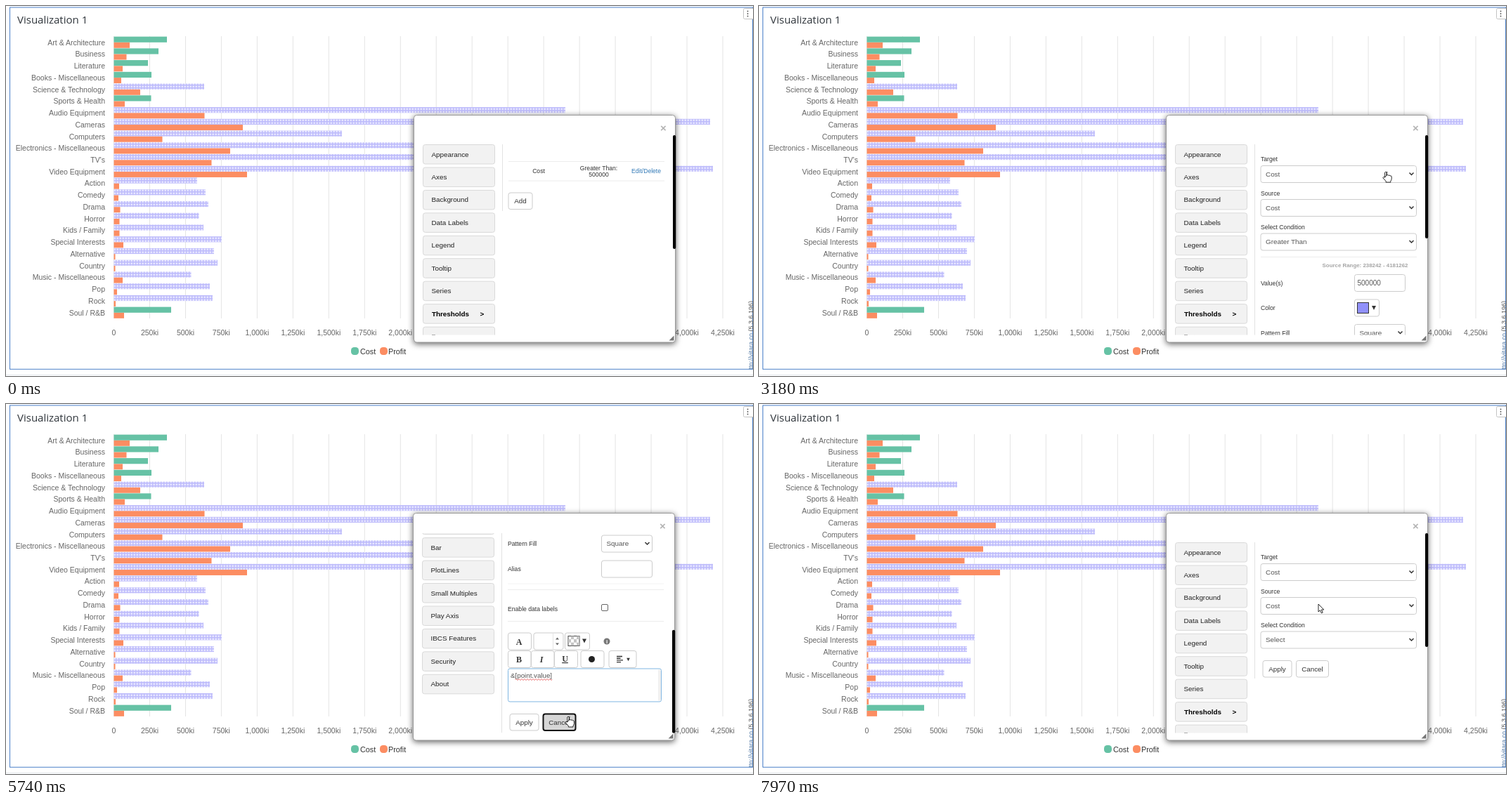
Animation of 1063x527 px, one loop 8000 ms. Source, as an HTML page:

```html
<!DOCTYPE html>
<html lang="en">
<head>
<meta charset="utf-8">
<title>Chart thresholds</title>
<style>
html, body { margin: 0; width: 100%; height: 100%; overflow: hidden; background: #fff; }
svg { display: block; font-family: "Liberation Sans", Arial, sans-serif; }
#panel { filter: drop-shadow(0 2.5px 4px rgba(0,0,0,.62)); }
</style>
</head>
<body>
<svg id="stage" width="1063" height="527" viewBox="0 0 1063 527"></svg>
<script>
const DURATION = 8000;

// Drawing helpers
const rect = (x, y, w, h, fill, extra = '') =>
  `<rect x="${x}" y="${y}" width="${w}" height="${h}" fill="${fill}" ${extra}/>`;
const path = (d, stroke, extra = '') => `<path d="${d}" fill="none" stroke="${stroke}" ${extra}/>`;
const solid = (d, fill) => `<path d="${d}" fill="${fill}"/>`;
const text = (x, y, size, str, fill = '#333', extra = '') =>
  `<text x="${x}" y="${y}" font-size="${size}" fill="${fill}" ${extra}>${str.replace(/&/g, '&amp;').replace(/>/g, '&gt;')}</text>`;
const group = (id, body, extra = '') => `<g id="${id}" ${extra}>${body}</g>`;
const rule = (y, color = '#ececec') => path(`M714 ${y}H936`, color);
const END = 'text-anchor="end"', MID = 'text-anchor="middle"', BOLD = 'font-weight="bold"';

// Chart: label, right edge of cost bar, right edge of profit bar
const rows = [
  ['Art & Architecture', 229, 176], ['Business', 217, 171.5], ['Literature', 202, 166],
  ['Books - Miscellaneous', 207, 164], ['Science & Technology', 282, 191], ['Sports & Health', 206.5, 169],
  ['Audio Equipment', 796, 282.5], ['Cameras', 1002, 337], ['Computers', 478, 222.5],
  ['Electronics - Miscellaneous', 800, 319], ["TV's", 700, 292.5], ['Video Equipment', 1006, 343],
  ['Action', 272, 161], ['Comedy', 284, 160], ['Drama', 288, 162.5], ['Horror', 274.5, 161.5],
  ['Kids / Family', 281, 161.5], ['Special Interests', 307, 167], ['Alternative', 296, 155.5],
  ['Country', 301, 155.5], ['Music - Miscellaneous', 263.5, 166], ['Pop', 290, 158],
  ['Rock', 294, 156], ['Soul / R&B', 235, 168]
];
const X0 = 153.5, TICK = 50.97, ROW = 16.74, TOP = 43.6;
const GREEN = '#66c2a5', ORANGE = '#fc8d62';

function chart() {
  let out = rect(5.5, 2, 1057, 515.3, '#fff', 'stroke="#4b80c9"') + path('M0 525.5H1063', '#e3e7ec') +
    text(16, 24.5, 15, 'Visualization 1', '#2f353b', 'font-family="Open Sans, sans-serif"') +
    rect(1049.5, 3.5, 16, 15, '#fff', 'stroke="#c4c4c4" rx="2"');
  for (const y of [7.5, 11, 14.5]) out += `<circle cx="1055.5" cy="${y}" r=".9" fill="#555"/>`;
  for (let i = 0; i <= 17; i++) {
    const x = X0 + i * TICK;
    out += path(`M${x} 43V445`, '#e4e4e4');
    out += text(x, 468.5, 10.5, i ? (i * 250).toLocaleString('en-US') + 'ki' : '0', '#666', MID);
  }
  rows.forEach(([label, cost, profit], i) => {
    const y = TOP + i * ROW;
    out += text(141, y + 12, 10.5, label, '#666', END);
    out += rect(X0, y, cost - X0, 8.2, cost > 255 ? 'url(#squares)' : GREEN);
    out += rect(X0, y + 8.3, profit - X0, 7.9, ORANGE);
  });
  out += rect(491, 486, 11, 11, GREEN, 'rx="4.5"') + text(504, 496, 10.8, 'Cost');
  out += rect(532, 486, 11, 11, ORANGE, 'rx="4.5"') + text(544, 496, 10.8, 'Profit');
  out += `<g clip-path="url(#credit)"><text transform="translate(1063 420) rotate(-90)" text-anchor="end" font-size="9" fill="#555">` +
    `<tspan fill="#5a7ea8" text-decoration="underline">http://vitara.co</tspan> (5.3.6.196)</text></g>`;
  return out;
}

// Dialog parts, laid out for scroll position 0
const menuItems = ['Appearance', 'Axes', 'Background', 'Data Labels', 'Legend', 'Tooltip', 'Series', 'Thresholds',
  'Bar', 'PlotLines', 'Small Multiples', 'Play Axis', 'IBCS Features', 'Security', 'About'];
const menu = () => menuItems.map((name, i) => {
  const y = 211 + 32.45 * i, active = name === 'Thresholds';
  return rect(592.5, y - 13.5, 102, 27.5, '#f2f2f2', 'stroke="#d9d9d9" rx="3"') +
    text(active ? 605 : 604.5, y + 3.5, 9.85, name, active ? '#000' : '#222', active ? BOLD : '') +
    (active ? text(673.5, y + 3.5, 9.85, '>', '#000', BOLD) : '');
}).join('');

const box = (x, y, w, h, extra = '') => rect(x + .5, y + .5, w - 1, h - 1, '#fff', `stroke="#ccc" rx="3" ${extra}`);
const label = (y, str) => text(714, y + 3, 8.65, str);
const button = (x, cy, w, str, extra = '') =>
  box(x, cy - 12, w, 24.5, extra) + text(x + w / 2, cy + 3.5, 9.8, str, '#333', MID);
const select = (x, y, w, str) => box(x, y, w, 25) + text(x + 7.5, y + 15.5, 9.9, str, '#555') +
  path(`M${x + w - 10.5} ${y + 10.5}l3 3 3-3`, '#333', 'stroke-width="1.5"');
const arrowDown = (x, y, s = 3) => solid(`M${x - s} ${y - s}h${2 * s}l${-s} ${2 * s}z`, '#333');
const divider = bottom => path(`M705.5 197V${bottom}`, '#e2e2e2');

const listView = () => divider(292) + rule(221.5) + rule(249) +
  text(757, 238, 8.6, 'Cost', '#333', MID) + text(842.5, 233.5, 8.6, 'Greater Than:', '#333', MID) +
  text(842.5, 242.5, 8.6, '500000', '#333', MID) + text(889, 238, 8.6, 'Edit/Delete', '#337ab7') +
  button(713.5, 277.5, 35, 'Add', 'id="add"');

const conditions = condition => label(218, 'Target') + select(713.5, 227, 222.5, 'Cost') +
  label(266.5, 'Source') + select(713.5, 275, 222.5, 'Cost') +
  label(315, 'Select Condition') + select(713.5, 323.5, 222.5, condition);

const newView = () => divider(391) + conditions('Select') +
  button(716.5, 377, 42, 'Apply') + button(764, 377, 47, 'Cancel');

function checker(x, y) {
  let out = rect(x, y, 16, 14, '#fff', 'stroke="#444"');
  for (let i = 0; i < 12; i++) {
    const col = i % 4, line = Math.floor(i / 4);
    if ((col + line) % 2) out += rect(x + col * 4, y + line * 4.6, 4, 4.6, '#c4c4c4');
  }
  return out;
}

function toolbar() {
  const serif = (x, y, str, extra) => text(x, y, 12, str, '#333', `${MID} ${BOLD} font-family="Liberation Serif, serif" ${extra || ''}`);
  const bars = [8, 5.5, 9, 6].map((w, i) => `M869 ${626 + i * 2.7}h${w}`).join('');
  return box(714, 592, 34, 25) + serif(730, 609, 'A') +
    box(750.5, 592, 43, 25) + solid('M782 602l2.5-3 2.5 3zM782 607h5l-2.5 3z', '#666') + path('M778.5 593V616', '#e4e4e4') +
    box(795, 592, 36, 25) + checker(800, 597) + arrowDown(823, 604) +
    `<circle cx="855" cy="604.5" r="4.5" fill="#777"/>` + text(855, 607.5, 8, 'i', '#fff', `${MID} ${BOLD}`) +
    box(714, 617.5, 33.5, 25) + serif(730, 634, 'B') + box(747, 617.5, 33.5, 25) + serif(762, 634, 'I', 'font-style="italic"') +
    box(780, 617.5, 34, 25) + serif(795.5, 633.5, 'U', 'text-decoration="underline"') +
    box(817.5, 617.5, 34, 25) + `<circle cx="833.5" cy="630" r="4.5" fill="#222"/>` +
    box(857.5, 617.5, 40, 25) + path(bars, '#333', 'stroke-width="1.4"') + arrowDown(885.5, 630.5, 2.3);
}

function editView() {
  let wave = 'M725 659';
  for (let i = 0; i < 13; i++) wave += 'q1 -2 2 0t2 0';
  return divider(735) + conditions('Greater Than') + rule(357.5) +
    text(923.5, 372, 7.9, 'Source Range: 238242 - 4181262', '#a5a5a5', `${END} ${BOLD}`) +
    label(394.5, 'Value(s)') + box(847, 382, 73, 25) + text(851.5, 398, 10, '500000', '#555') +
    label(429.5, 'Color') + box(847, 417.5, 36, 25) + rect(851.5, 422.5, 16, 15, '#9090fa', 'stroke="#333"') + arrowDown(875, 430) +
    label(465.5, 'Pattern Fill') + select(847, 453, 73, 'Square') +
    label(501.5, 'Alias') + box(847, 489, 73, 25) + rule(522.5, '#f3f3f3') + rule(531) +
    label(558.5, 'Enable data labels') + rect(847.5, 552, 9, 9, '#fff', 'stroke="#666" rx="1.5"') + rule(576) +
    toolbar() + rect(714.5, 643.5, 218, 47, '#fff', 'stroke="#7fb6e2" rx="2.5"') +
    rect(928, 645, 4, 44, '#f0f0f0') + text(718, 656.5, 9.75, '&[point.value]', '#555') + path(wave, '#d33', 'stroke-width=".8"') +
    button(716.5, 719.5, 42, 'Apply') + button(764, 719.5, 47, 'Cancel', 'id="cancel"');
}

const cursors = () =>
  group('arrow', `<path d="M0 0V11L2.5 8.7 4.3 12.8 6.2 12 4.4 8H7.8Z" fill="#fff" stroke="#111" stroke-width=".9"/>`) +
  group('hand', `<path d="M-1.2 8V1Q0-.8 1.3 1V5.2L2-.2M1.3 5Q2.8 3.6 4 5.3 5.3 4.2 6.3 5.8 8 5.2 8.4 7V10.5Q8 12 7 13.4V15H.3V13.4L-4 8.6Q-3.6 6.6-1.2 8Z" fill="#fff" stroke="#111" stroke-width=".9" stroke-linejoin="round"/>`) +
  group('beam', path('M-2 -5Q0 -5 0 -4Q0 -5 2 -5M0 -4V4M-2 5Q0 5 0 4Q0 5 2 5', '#222'));

const stage = document.getElementById('stage');
stage.innerHTML = `<defs>
  <pattern id="squares" width="4" height="4" patternUnits="userSpaceOnUse">${rect(0, 0, 4, 4, '#e6e5ff')}${path('M0 .7H4M.7 0V4', '#bdbbfb', 'stroke-width="1.4"')}</pattern>
  <clipPath id="credit">${rect(1040, 400, 23, 117, '#000')}</clipPath>
  <clipPath id="view">${rect(560, 184, 420, 284.5, '#000')}</clipPath></defs>` +
  chart() +
  group('dialog', rect(579.5, 155.5, 372, 323.5, '#fff', 'id="panel" stroke="#999" rx="4"') +
    `<g clip-path="url(#view)">` + group('content', menu() + group('list', listView()) + group('edit', editView()) + group('fresh', newView())) + `</g>` +
    group('edge', text(934.5, 179, 15, '×', '#b3b3b3', `${MID} ${BOLD}`) +
      rect(948, 184, 4.2, 162, '#000', 'id="thumb" rx="2"')) +
    group('grip', solid('M949.5 469.5V476.5H942.5Z', '#777'))) +
  group('cursor', cursors());

const $ = Object.fromEntries([...stage.querySelectorAll('[id]')].map(el => [el.id, el]));

// Tracks: [time, ...values], linear in between
const pointer = [
  [70, 1020, 502], [200, 996, 452], [330, 958, 366], [460, 918, 280], [590, 901, 243],
  [800, 901, 243], [940, 946, 472], [1080, 953, 478], [1220, 946, 472], [1400, 912, 400], [1600, 876, 313],
  [1670, 875, 311], [2140, 885, 238], [2340, 886, 238], [2540, 892, 234],
  [3180, 892, 234], [3230, 882, 338], [3720, 882, 338], [4050, 905, 455], [4310, 902, 418],
  [4380, 900, 415], [4590, 864, 362], [4900, 864, 362], [5400, 800, 445],
  [6150, 800, 445], [6330, 806, 370], [6480, 806, 370], [6900, 747, 276],
  [7560, 747, 276], [7970, 796, 285]
];
const scrolling = [
  [3520, 0], [3700, 46.5], [3900, 98], [4060, 110.5], [4730, 110.5], [4950, 185], [5150, 246], [5300, 266.5],
  [5880, 266.5], [5881, 214], [6120, 214], [6350, 27.5], [6460, 0]
];
const resize = [[940, 0], [1080, 8], [1220, 0]];
const shapes = [[0, ''], [70, 'arrow'], [2400, 'hand'], [3200, 'arrow'], [4480, 'beam'],
  [4900, 'arrow'], [5350, 'hand'], [5900, 'arrow'], [6850, 'hand'], [7570, 'arrow']];
const views = [[0, 'list'], [2750, 'edit'], [5880, 'list'], [7500, 'fresh']];

function track(table, t) {
  const next = table.findIndex(step => step[0] > t);
  if (next < 0) return table[table.length - 1].slice(1);
  if (next === 0) return table[0].slice(1);
  const a = table[next - 1], b = table[next], k = (t - a[0]) / (b[0] - a[0]);
  return a.slice(1).map((v, i) => v + (b[i + 1] - v) * k);
}
const stateAt = (table, t) => table.filter(step => step[0] <= t).pop()[1];
const move = (el, x, y) => el.setAttribute('transform', `translate(${x} ${y})`);
const show = (ids, current) => ids.forEach(id => $[id].style.display = id === current ? '' : 'none');
const set = (el, attrs) => Object.entries(attrs).forEach(([k, v]) => el.setAttribute(k, v));

function render(t) {
  const view = stateAt(views, t), [scroll] = track(scrolling, t), [grow] = track(resize, t);
  show(['list', 'edit', 'fresh'], view);
  show(['arrow', 'hand', 'beam'], stateAt(shapes, t));
  move($.cursor, ...track(pointer, t));
  move($.dialog, t < 1220 ? 1 : 0, 0);
  move($.content, -grow, -scroll);
  move($.edge, grow, 0);
  move($.grip, grow, grow * .8);
  set($.panel, { x: 579.5 - grow, width: 372 + 2 * grow, height: 323.5 + grow * .8 });
  const total = view === 'edit' ? 549 : 498;
  set($.thumb, { y: 184 + scroll * 284 / total, height: 284 * 284 / total });
  const pressed = t >= 5670;
  set($.cancel, { fill: pressed ? '#d6d6d6' : t > 5400 ? '#e6e6e6' : '#fff',
    stroke: pressed ? '#111' : '#ccc', 'stroke-width': pressed ? 2 : 1 });
  set($.add, { fill: t > 6850 ? '#e6e6e6' : '#fff', stroke: t > 7240 ? '#8c8c8c' : '#ccc' });
}

function tick(now) {
  render(now % DURATION);
  requestAnimationFrame(tick);
}
render(0);
requestAnimationFrame(tick);
</script>
</body>
</html>
```
